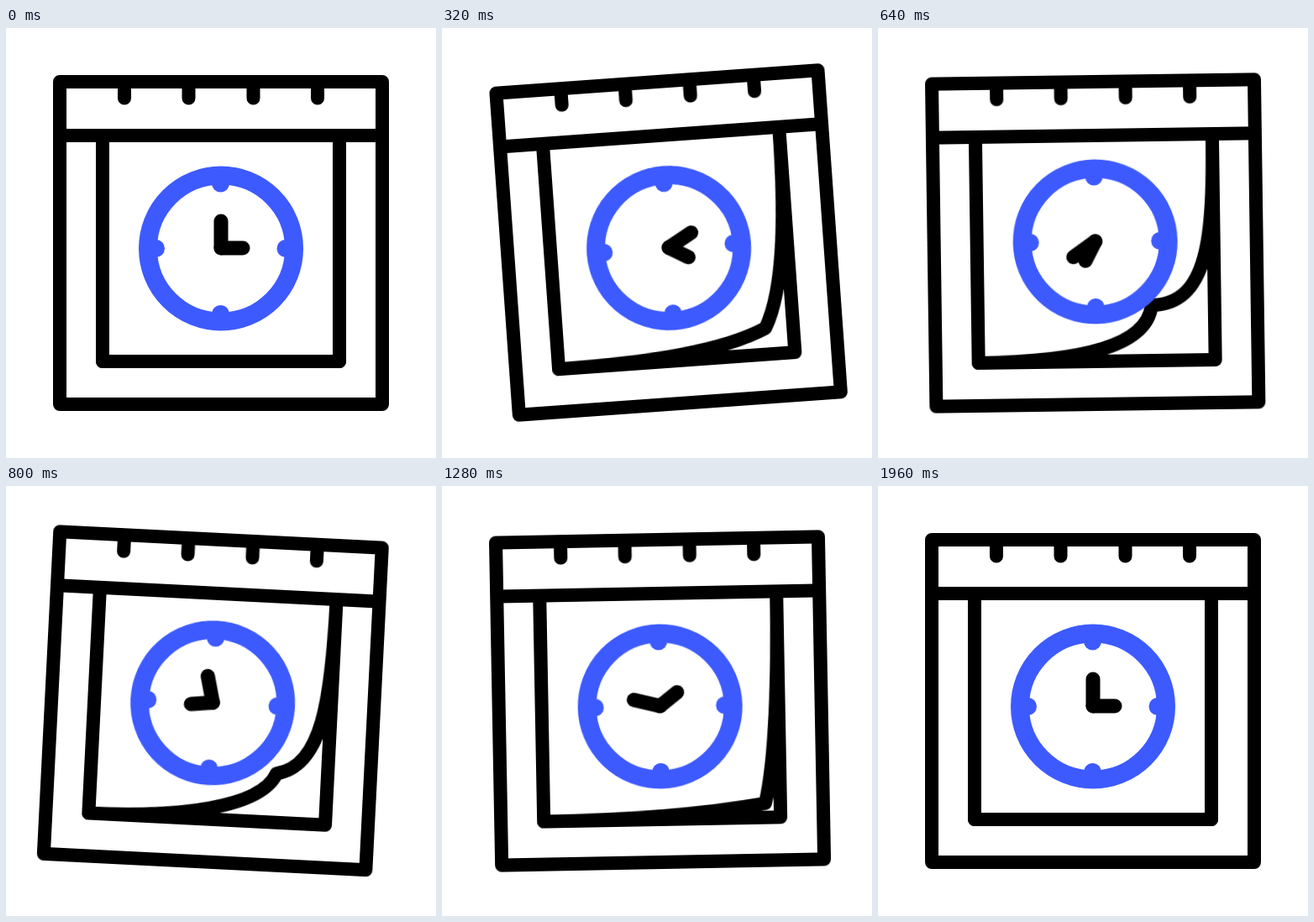
An HTML page for the animation above (2 s loop, 512x512 px).

```html
<!DOCTYPE html>
<html lang="en">
<head>
<meta charset="utf-8">
<title>Calendar clock</title>
<style>
  :root {
    --ink: #000;
    --blue: #3d5aff;
  }
  html, body { margin: 0; width: 100%; height: 100%; overflow: hidden; background: #fff; }
  svg { display: block; width: 100vw; height: 100vh; }

  .lines { fill: none; stroke: var(--ink); stroke-width: 16; stroke-linecap: round; stroke-linejoin: round; }
  .ring { fill: none; stroke: var(--blue); stroke-width: 22; }
  .marks { fill: var(--blue); }
  .hand { stroke: var(--ink); stroke-width: 17; stroke-linecap: round; }

  /* Sine in-out between keyframes unless a keyframe says otherwise. */
  .calendar, .clock, .hand, .page { animation: 2s cubic-bezier(.37, 0, .63, 1) infinite; }
  .calendar { transform-origin: 256px 64px; animation-name: swing; }
  .clock { animation-name: lift; }
  .hand { transform-origin: 256px 262px; }
  .minute { animation-name: turn-minute; }
  .hour { animation-name: turn-hour; }
  .page { animation-name: curl; }

  @keyframes swing {
    0%, 1% { transform: rotate(0deg); }
    22% { transform: rotate(-5deg); }
    41.5% { transform: rotate(3deg); }
    65.5% { transform: rotate(-1.1deg); }
    89%, 100% { transform: rotate(0deg); }
  }

  @keyframes lift {
    0%, 16% { transform: translateY(0); }
    32% { transform: translateY(-8px); }
    48%, 100% { transform: translateY(0); }
  }

  @keyframes turn-minute {
    0%, 1% { transform: rotate(0deg); }
    81%, 100% { transform: rotate(720deg); }
  }

  @keyframes turn-hour {
    0%, 1% { transform: rotate(0deg); }
    81%, 100% { transform: rotate(360deg); }
  }

  /* The free corner of the page peels up and settles back. */
  @keyframes curl {
    0% {
      d: path("M397 128 C397 230 397 310 397 397 C310 397 220 397 115 397");
      animation-timing-function: cubic-bezier(.4, 0, .67, .6);
    }
    16% {
      d: path("M397 128 C397 230 390 320 364 366 C310 390 220 397 115 397");
      animation-timing-function: cubic-bezier(.33, .29, .6, 1);
    }
    32% {
      d: path("M397 128 C397 250 390 331 322 331 C316 385 220 397 115 397");
      animation-timing-function: cubic-bezier(.33, 0, .67, .77);
    }
    48% {
      d: path("M397 128 C397 250 388 322 356 349 C324 376 220 397 115 397");
      animation-timing-function: linear;
    }
    64% {
      d: path("M397 128 C397 230 392 330 379 380 C310 391 220 397 115 397");
      animation-timing-function: cubic-bezier(.33, .4, .6, 1);
    }
    80%, 100% {
      d: path("M397 128 C397 230 397 310 397 397 C310 397 220 397 115 397");
    }
  }
</style>
</head>
<body>
<svg viewBox="0 0 512 512">
  <g class="calendar">
    <g class="lines">
      <path d="M64 64H448V448H64Z M64 128H448"/>
      <path d="M141 64V83.5 M217.5 64V83.5 M294.5 64V83.5 M371 64V83.5"/>
      <path d="M115 128V397H397V128"/>
      <path class="page" d="M397 128 C397 230 397 310 397 397 C310 397 220 397 115 397"/>
    </g>
    <g class="clock">
      <circle class="ring" cx="256" cy="262.5" r="87"/>
      <g class="marks">
        <circle cx="255.5" cy="185" r="10.5"/>
        <circle cx="333" cy="262.5" r="10.5"/>
        <circle cx="255.5" cy="340.5" r="10.5"/>
        <circle cx="178.5" cy="262.5" r="10.5"/>
      </g>
      <path class="hand minute" d="M256 262V230"/>
      <path class="hand hour" d="M256 262H282"/>
    </g>
  </g>
</svg>
</body>
</html>
```
